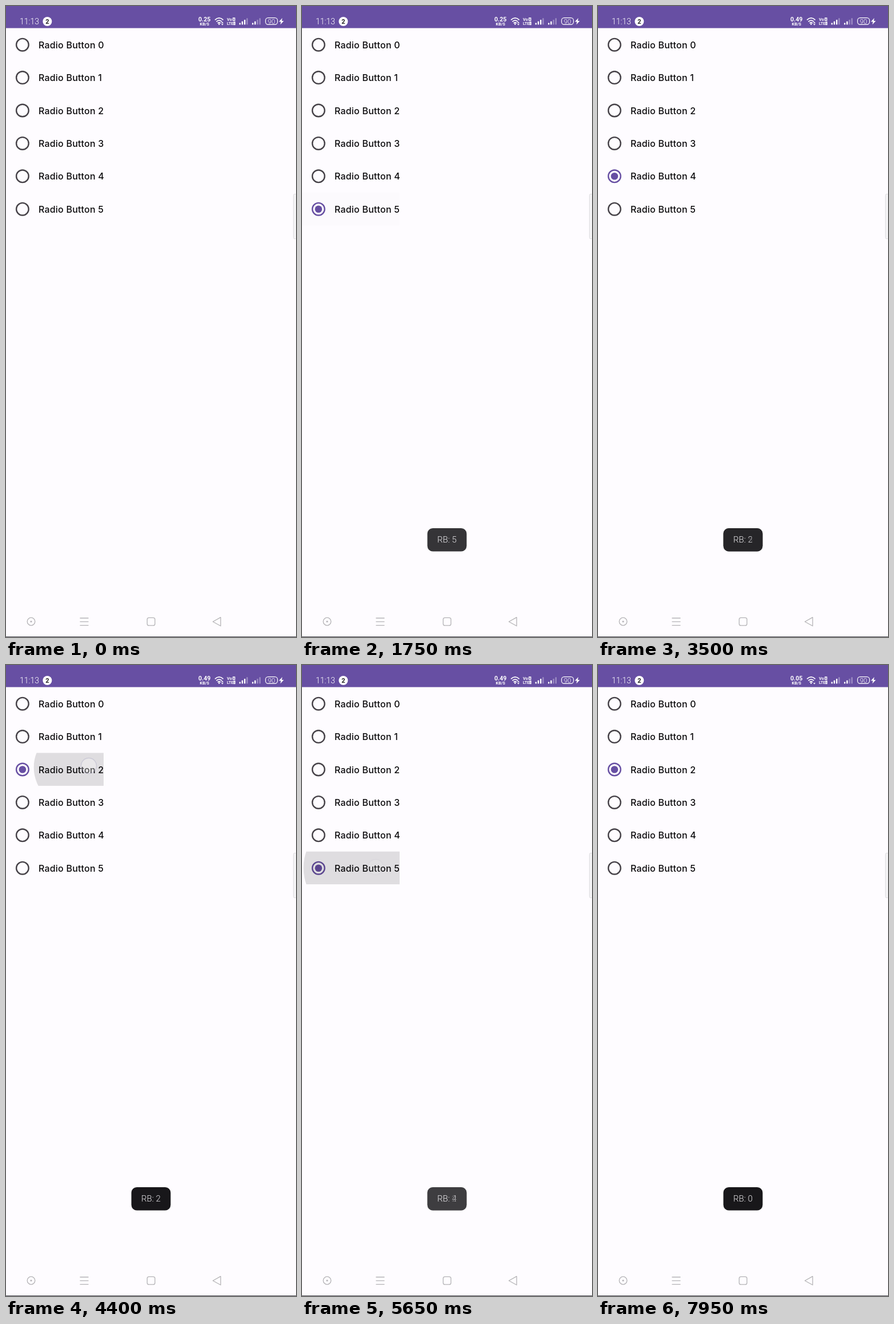
Animation, 508 px wide and 1102 px high, one loop 8000 ms. Source, as an HTML page:

```html
<!DOCTYPE html>
<html lang="en">
<head>
<meta charset="utf-8">
<title>Radio buttons</title>
<style>
html, body { margin: 0; width: 100%; height: 100%; overflow: hidden; background: #fefcff; }
svg { display: block; width: 100%; height: 100%; }
text { font-family: Roboto, sans-serif; }
.label { font: 500 16px Inter, sans-serif; letter-spacing: .2px; fill: #0b0a0c; }
.thin { font-weight: 300; }
.bold { font-weight: 700; }
</style>
</head>
<body>
<svg id="stage" viewBox="0 0 508 1102" preserveAspectRatio="none">
  <defs><clipPath id="rowClip"><rect id="rowRect" x="0" height="57.4"/></clipPath></defs>
  <rect width="508" height="1102" fill="#fefcff"/>
  <rect width="508" height="38.6" fill="#674fa3"/>

  <g fill="#fff">
    <text class="thin" x="24" y="31.5" font-size="14">11:13</text>
    <circle cx="72.4" cy="27" r="8"/>
    <text class="bold" x="72.4" y="31" font-size="11" text-anchor="middle" style="fill:#222">2</text>
    <text id="speed" class="bold" x="347.7" y="27" font-size="10.6" text-anchor="middle"></text>
    <text class="bold" x="347.7" y="34" font-size="7.2" text-anchor="middle">KB/S</text>
    <g fill="none" stroke="#fff" stroke-width="1.7">
      <path d="M366 24.3Q373.3 17.5 380.6 24.3M368.4 27.4Q373.3 22.8 378.2 27.4M370.7 30.2Q373.3 27.8 375.9 30.2"/>
    </g>
    <circle cx="373.3" cy="31.8" r="1.3"/>
    <path id="up" d="M377 30l2-2.4 2 2.4z"/>
    <path d="M377 31.3h4l-2 2.4z"/>
    <g class="bold" font-size="7.4" font-weight="700">
      <text x="387" y="26.4">Vo</text><text x="387" y="33.4" font-size="6.8">LTE</text>
    </g>
    <path fill="none" stroke="#fff" stroke-width="1.4" d="M397.7 21h3v4.4h-3zM399 28h2v4.6h-2z"/>
    <g id="bars"></g>
    <rect x="454.6" y="20.6" width="21" height="11.8" rx="4.6" fill="none" stroke="#fff" stroke-width="1.2"/>
    <text class="thin" x="465.1" y="30.8" font-size="11.5" text-anchor="middle">90</text>
    <path d="M484 21l-6 6.4h3.6l-1 5.2 6-6.6h-3.6z"/>
  </g>

  <g id="rows"></g>
  <circle id="ripple" clip-path="url(#rowClip)" fill="#000"/>
  <circle id="touch" r="13.5" fill="rgba(255,255,255,.3)" stroke="rgba(120,115,165,.22)" stroke-width="1.4"/>

  <rect x="503.5" y="328.5" width="6" height="78" rx="2" fill="#f5f4f6" stroke="#dedde0"/>
  <g id="toasts"></g>

  <g fill="none" stroke="#b4b3b6" stroke-width="1.3">
    <circle cx="44" cy="1075" r="6.8"/>
    <circle cx="44" cy="1075" r="1.6" fill="#b4b3b6" stroke="none"/>
    <path d="M129.5 1069h15M129.5 1075.3h15M129.5 1081.6h15"/>
    <rect x="247.3" y="1068.3" width="13.6" height="13.6" rx="3"/>
    <path d="M362.4 1075.2L376 1067.6V1082.8z" stroke-linejoin="round"/>
  </g>
  <rect y="1101" width="508" height="1" fill="#59565e"/>
</svg>

<script>
const LOOP = 8000, PITCH = 57.4, TOP = 38.7;
const ROW_WIDTHS = [173, 168, 171, 171, 173, 171];
// time of the press, row, place of the finger
const taps = [
  [1240, 5, 136, 354], [2250, 2, 140, 181], [2900, 4, 138, 297], [3790, 0, 140, 77],
  [4290, 2, 145, 176], [4850, 4, 136, 297], [5467, 5, 129, 353], [6260, 2, 128, 181]
].map(([at, row, x, y]) => ({ at, row, x, y }));
// fade-in start, fade-out start, number
const messages = [[1430, 3425, 5], [3250, 5545, 2], [5500, 7480, 4], [7460, 9e9, 0]];

const $ = id => document.getElementById(id);
const clamp = v => Math.min(1, Math.max(0, v));
const decel = v => 1 - (1 - clamp(v)) ** 2;
const mix = (a, b, p) => a + (b - a) * p;
const standard = v => {
  const u = 1 - (1 - clamp(v)) ** 1.6;
  return u * u * (3 - 2 * u);
};

function add(parent, tag, attrs, text = '') {
  const el = document.createElementNS('http://www.w3.org/2000/svg', tag);
  set(el, attrs);
  el.textContent = text;
  return parent.appendChild(el);
}
function set(el, attrs) {
  for (const k in attrs) el.setAttribute(k, attrs[k]);
}

for (const [x0, lit] of [[408.6, 3], [431, 2]])
  for (let i = 0; i < 4; i++) {
    const h = 3 + i * 2.8;
    add($('bars'), 'rect', { x: x0 + i * 4.2, y: 32.6 - h, width: 2.4, height: h, rx: .6, opacity: i < lit ? 1 : .35 });
  }

const radios = ROW_WIDTHS.map((w, i) => {
  const cy = 67.7 + PITCH * i;
  const ring = add($('rows'), 'circle', { cx: 28.9, cy, r: 10.8, fill: 'none', 'stroke-width': 2.4 });
  const dot = add($('rows'), 'circle', { cx: 28.9, cy, fill: '#674fa3' });
  add($('rows'), 'text', { class: 'label', x: 57, y: cy + 6 }, 'Radio Button ' + i);
  return { ring, dot };
});

const toasts = messages.map(([start, end, n]) => {
  const g = add($('toasts'), 'g', {});
  add(g, 'rect', { x: 219.6, y: 912, width: 68.8, height: 40.6, rx: 9.5, fill: '#18171a' });
  add(g, 'text', { class: 'thin', x: 254, y: 937.2, 'font-size': 15, 'text-anchor': 'middle', fill: '#e6e5e8' }, 'RB: ' + n);
  return { g, start, end };
});

function drawRadios(t) {
  const picked = taps.filter(k => t >= k.at + 50);
  const now = picked.at(-1), before = picked.at(-2);
  radios.forEach(({ ring, dot }, i) => {
    const p = now ? clamp((t - now.at - 50) / 60) : 0;
    const on = now?.row === i ? p : before?.row === i ? 1 - p : 0;
    const rgb = [[70, 103], [66, 79], [72, 163]].map(([a, b]) => mix(a, b, on));
    ring.setAttribute('stroke', `rgb(${rgb})`);
    dot.setAttribute('r', 6.3 * on);
  });
}

function drawTap(t) {
  const tap = taps.findLast(k => t >= k.at);
  const age = tap ? t - tap.at : 9e9;
  set($('touch'), {
    cx: tap?.x ?? 0, cy: tap?.y ?? 0,
    opacity: age > 400 ? 0 : Math.min(1, Math.exp((110 - age) / 50))
  });
  const spread = age - 37;
  if (spread < 0 || spread > 490) return set($('ripple'), { opacity: 0 });
  const w = ROW_WIDTHS[tap.row], y = TOP + PITCH * tap.row, p = standard(spread / 225);
  set($('rowRect'), { y, width: w });
  set($('ripple'), {
    cx: mix(tap.x, w / 2, p),
    cy: mix(tap.y, y + PITCH / 2, p),
    r: mix(w * .3, Math.hypot(w, PITCH) / 2, p),
    opacity: .12 * clamp(spread / 40) * (1 - clamp((spread - 240) / 250))
  });
}

function frame(ms) {
  const t = ms % LOOP;
  $('speed').textContent = t < 2150 ? '0.25' : t < 6150 ? '0.49' : '0.05';
  $('up').setAttribute('opacity', t < 7100 ? 1 : 0);
  drawRadios(t);
  drawTap(t);
  for (const { g, start, end } of toasts)
    g.setAttribute('opacity', Math.min(decel((t - start) / 500), 1 - clamp((t - end) / 300)));
  requestAnimationFrame(frame);
}
requestAnimationFrame(frame);
</script>
</body>
</html>
```
